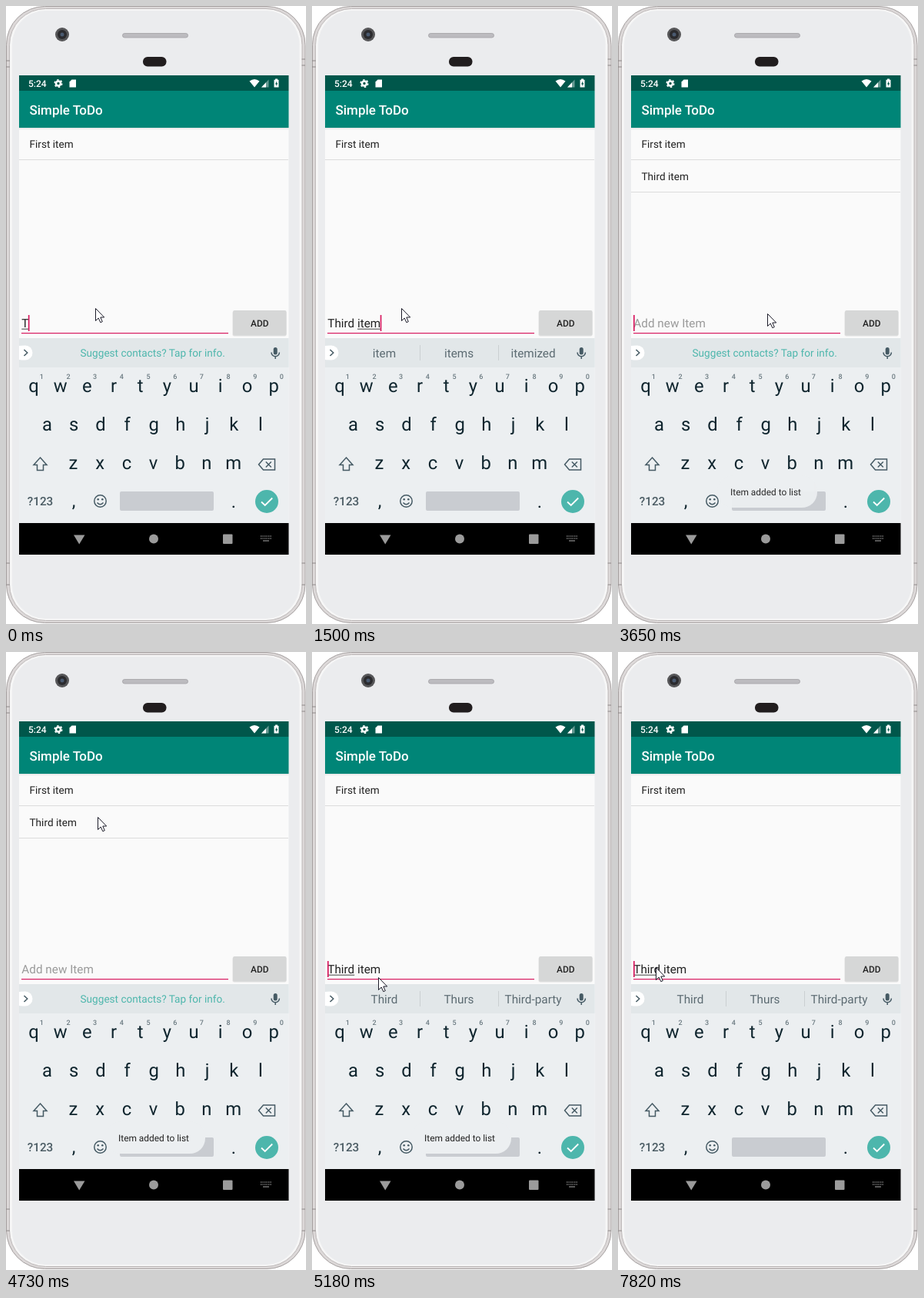
These frames come from a looping animation (390 px wide and 802 px high, 8000 ms). An HTML page:

```html
<!DOCTYPE html>
<html lang="en">
<head>
<meta charset="utf-8">
<style>
html, body { margin: 0; width: 100%; height: 100%; overflow: hidden; background: #fff; }
svg { display: block; width: 390px; height: 802px; font-family: Roboto, sans-serif; }
text { white-space: pre; text-rendering: geometricPrecision; }
.mid { text-anchor: middle; }
.line { fill: none; stroke: #455a64; stroke-width: 1.5; }
</style>
</head>
<body>
<svg viewBox="0 0 390 802">
  <defs>
    <linearGradient id="shade" x2="0" y2="1">
      <stop offset="0" stop-color="#000" stop-opacity=".1"/><stop offset="1" stop-color="#000" stop-opacity="0"/>
    </linearGradient>
  </defs>

  <!-- phone body -->
  <rect x=".5" y=".5" width="388.500" height="800" rx="50" fill="#dcd8d8" stroke="#a5a0a0"/>
  <rect x="4.500" y="3.500" width="380.500" height="794" rx="47" fill="#f6f6f6" stroke="#bdb8b8"/>
  <rect x="8" y="6" width="373.500" height="789" rx="44" fill="#ebecee"/>
  <path d="M0 71H5M0 79H5M384.500 69H389M384.500 77H389M0 723H5M0 751H5M384.500 723H389M384.500 751H389" stroke="#8d8888"/>
  <circle cx="73" cy="37" r="9" fill="#565658"/><circle cx="73" cy="37" r="6" fill="#2b2b2e"/>
  <circle cx="73" cy="37" r="2.500" fill="#4a5a70"/>
  <rect x="151.500" y="35.500" width="85" height="5.500" rx="2.700" fill="#bcbbbf" stroke="#a2a1a5" stroke-width=".8"/>
  <rect x="178" y="66" width="30.500" height="12.500" rx="6" fill="#211d1e"/>

  <!-- app -->
  <rect x="17" y="90" width="350.500" height="622" fill="#fafafa"/>
  <rect x="17" y="90" width="350.500" height="20" fill="#00574b"/>
  <rect x="17" y="110" width="350.500" height="48" fill="#008577"/>
  <rect x="17" y="158" width="350.500" height="3" fill="url(#shade)"/>
  <g fill="#fff">
    <text x="29" y="105" font-size="12" font-weight="500">5:24</text>
    <circle cx="68" cy="100.500" r="3" fill="none" stroke="#fff" stroke-width="2.600"/>
    <circle cx="68" cy="100.500" r="4.800" fill="none" stroke="#fff" stroke-width="1.500" stroke-dasharray="2.500 2.527"/>
    <path d="M85.500 95.500H91V105.500H82.500V98.500Z"/>
    <path d="M316.500 97.500Q323 92.500 329.500 97.500L323 105.500Z"/>
    <path d="M341.500 95.500V105.500H332Z" opacity=".4"/><path d="M338 99.200V105.500H332Z"/>
    <path d="M350 94.500H353V95.700H354.500V105.500H348.500V95.700H350Z"/>
    <path d="M352 97.500L350 101.500H351.300V104L353.300 100.200H352Z" fill="#00574b"/>
    <text x="30.500" y="141" font-size="17" font-weight="500">Simple ToDo</text>
  </g>
  <g font-size="13.600" fill="#222">
    <rect id="ripple" x="17" y="200" width="350" height="41" fill="#000"/>
    <text x="30.500" y="184">First item</text>
    <path d="M17 199.500H367" stroke="#dcdcdc"/>
    <g id="row"><text x="30.500" y="225.500">Third item</text><path d="M17 241.500H367" stroke="#dcdcdc"/></g>
  </g>
  <g font-size="15.300">
    <text id="hint" x="20.300" y="417.300" fill="#9a9a9a">Add new Item</text>
    <text id="entry" x="20.300" y="417.300" fill="#222"></text>
  </g>
  <rect id="compose" y="418.700" height="1" fill="#444"/>
  <rect x="20" y="424" width="269" height="1.200" fill="#d81b60"/>
  <rect id="caret" y="401" width="1.700" height="21" fill="#d81b60"/>
  <rect x="294.500" y="396" width="70" height="32.500" rx="2" fill="#000" opacity=".1"/>
  <rect id="button" x="295" y="395" width="69.500" height="32.500" rx="2"/>
  <text class="mid" x="329.700" y="415.500" font-size="11.900" font-weight="500" fill="#222">ADD</text>

  <!-- keyboard -->
  <rect x="17" y="431" width="350.500" height="240" fill="#eceff1"/>
  <rect x="17" y="431" width="350.500" height="38" fill="#e2e7e9"/>
  <path d="M17 441Q20 440.500 25 440.500A9.500 9.500 0 0 1 25 459.500Q20 459.500 17 459Z" fill="#fff"/>
  <path d="M23.500 446L27.800 450L23.500 454" class="line"/>
  <text id="tip" class="mid" x="190.700" y="455" font-size="13.600" fill="#4db6ac">Suggest contacts? Tap for info.</text>
  <g id="words" class="mid" font-size="15.300" fill="#5c6b72">
    <path d="M140.500 440V460M242.500 440V460" stroke="#cbd0d2"/>
    <text x="94" y="455.700"></text><text x="191" y="455.700"></text><text x="287.500" y="455.700"></text>
  </g>
  <rect x="347.700" y="443" width="5" height="9.500" rx="2.500" fill="#455a64"/>
  <path class="line" d="M345 449.500A5.200 5.200 0 0 0 355.400 449.500M350.200 454.700V458"/>
  <g id="keys" class="mid" font-size="23.800" fill="#0f252e"></g>
  <path class="line" d="M44.500 586L53 595.500H48.500V602.500H40.500V595.500H36Z"/>
  <path class="line" d="M328.500 595L334.500 588H349.500V602H334.500ZM337.800 591.500L344.800 598.500M344.800 591.500L337.800 598.500"/>
  <text class="mid" x="44.500" y="648" font-size="15.300" font-weight="500" fill="#4a5b63">?123</text>
  <circle class="line" cx="122.500" cy="642.500" r="7.700"/>
  <circle cx="119.700" cy="640.300" r="1.300" fill="#455a64"/><circle cx="125.300" cy="640.300" r="1.300" fill="#455a64"/>
  <path class="line" d="M118.500 644.500Q122.500 649 126.500 644.500"/>
  <rect x="148" y="630" width="122" height="25" rx="2" fill="#c9ccd1"/>
  <circle cx="339" cy="643" r="15" fill="#4db6ac"/>
  <path d="M332 643.500L336.700 648L346.200 638.500" fill="none" stroke="#fff" stroke-width="1.800"/>
  <g id="toast">
    <rect x="129" y="609" width="130" height="42" rx="20" fill="#eceff1"/>
    <text class="mid" x="192" y="635" font-size="11.900" fill="#222">Item added to list</text>
  </g>

  <!-- navigation bar -->
  <rect x="17" y="671" width="350.500" height="41" fill="#000"/>
  <g fill="#9b9b9b">
    <path d="M88 686.500H102.500L95.200 698.500Z"/><circle cx="192" cy="691.500" r="6"/>
    <rect x="282" y="685.500" width="12.500" height="12.500" rx="1"/>
    <path d="M331 688H345M331 691H345" stroke="#858585" stroke-width="1.300" stroke-dasharray="1.300 1.200"/>
    <path d="M334 694H342" stroke="#858585" stroke-width="1.300"/>
  </g>
  <path id="mouse" d="M.5 .5V16.500L4.200 13L6.800 18.700L9.300 17.600L6.800 12H11.700Z" fill="#fff" stroke="#1b1b28"/>
</svg>
<script>
const $ = id => document.getElementById(id);
const LOOP = 8000;

function addKeys(letters, x, y, digits = '') {
  [...letters].forEach((letter, i) => {
    const cx = x + i * 34.68;
    $('keys').innerHTML += `<text x="${cx}" y="${y}">${letter}</text>` + (digits &&
      `<text x="${cx + 10.3}" y="484" font-size="9" font-weight="500" fill="#6b7a81">${digits[i]}</text>`);
  });
}
addKeys('qwertyuiop', 36, 501, '1234567890');
addKeys('asdfghjkl', 53.5, 551);
addKeys('zxcvbnm', 87.5, 601);
addKeys(',', 88, 650);
addKeys('.', 296, 651);

// Each track holds [start time, value...] entries; a value lasts until the next one.
const typed = [[0, 'T'], [370, 'Th'], [490, 'Thi'], [610, 'Thir'], [860, 'Third'], [980, 'Third '],
  [1100, 'Third i'], [1220, 'Third it'], [1340, 'Third ite'], [1500, 'Third item'], [3230, ''], [4880, 'Third item']];
const suggestions = [[0, ''], [370, 'Th The They'], [490, 'Thi This Think'], [610, 'Thir Third Thirty'],
  [860, 'Third Thirds Third-party'], [980, 'party and one'], [1100, 'I is in'], [1220, 'it its item'],
  [1340, 'ite item items'], [1500, 'item items itemized'], [3380, ''], [5030, 'Third Thurs Third-party']];
const caretOn = [[0, 1], [2060, 0], [2510, 1], [2990, 0], [3230, 1], [3770, 0], [4160, 1], [4730, 0],
  [4880, 1], [5450, 0], [5810, 1], [6370, 0], [6870, 1], [7310, 0], [7820, 1]];
const mouse = [[0, 116, 392], [2210, 174, 327], [2360, 177, 329], [2510, 270, 380], [2630, 379, 423],
  [2750, 341, 408], [3500, 323, 404], [3650, 194, 399], [3770, 140, 392], [3890, 123, 392],
  [4040, 123, 290], [4160, 124, 218], [4310, 123, 214], [4460, 119, 214], [5030, 102, 350],
  [5180, 86, 422], [5450, 71, 421], [7580, 64, 417], [7700, 56, 412], [7820, 49, 409]];
const toast = [[0, 0], [3380, .25], [3500, .65], [3650, .95], [3770, 1], [5300, .85], [5450, .55], [5570, .25],
  [5690, .1], [5810, 0]];
const button = [[0, '#d6d7d7'], [2870, '#cccdcd'], [2990, '#c2c3c3'], [3380, '#cfd0d0'], [3500, '#d6d7d7']];
const ripple = [[0, 0], [4880, .09], [5030, .05], [5180, 0]];

const at = (track, t) => track.findLast(entry => entry[0] <= t).slice(1);
const show = (id, visible) => $(id).setAttribute('opacity', +visible);

function draw(now) {
  const t = now % LOOP;
  const [text] = at(typed, t), [words] = at(suggestions, t);
  const entry = $('entry'), caret = $('caret'), compose = $('compose');
  entry.textContent = text;
  const widthOf = n => n ? entry.getSubStringLength(0, n) : 0;

  // After loading the item back, the caret sits at the start of its first word.
  const editing = t >= 4880;
  const from = editing ? 0 : text.lastIndexOf(' ') + 1;
  const to = editing ? 5 : text.length;
  compose.setAttribute('x', 20.3 + widthOf(from));
  compose.setAttribute('width', widthOf(to) - widthOf(from));
  caret.setAttribute('x', 20 + (editing ? 0 : Math.max(0, widthOf(to) - .3)));
  show('caret', at(caretOn, t)[0]);
  show('hint', !text);

  show('tip', !words);
  show('words', words !== '');
  $('words').querySelectorAll('text').forEach((label, i) => label.textContent = words.split(' ')[i] || '');

  show('row', t >= 3230 && t < 4880);
  show('ripple', at(ripple, t)[0]);
  show('toast', at(toast, t)[0]);
  $('button').setAttribute('fill', at(button, t)[0]);
  $('mouse').setAttribute('transform', `translate(${at(mouse, t)})`);
}

const start = performance.now();
function tick() {
  draw(performance.now() - start);
  requestAnimationFrame(tick);
}
tick();
</script>
</body>
</html>
```
